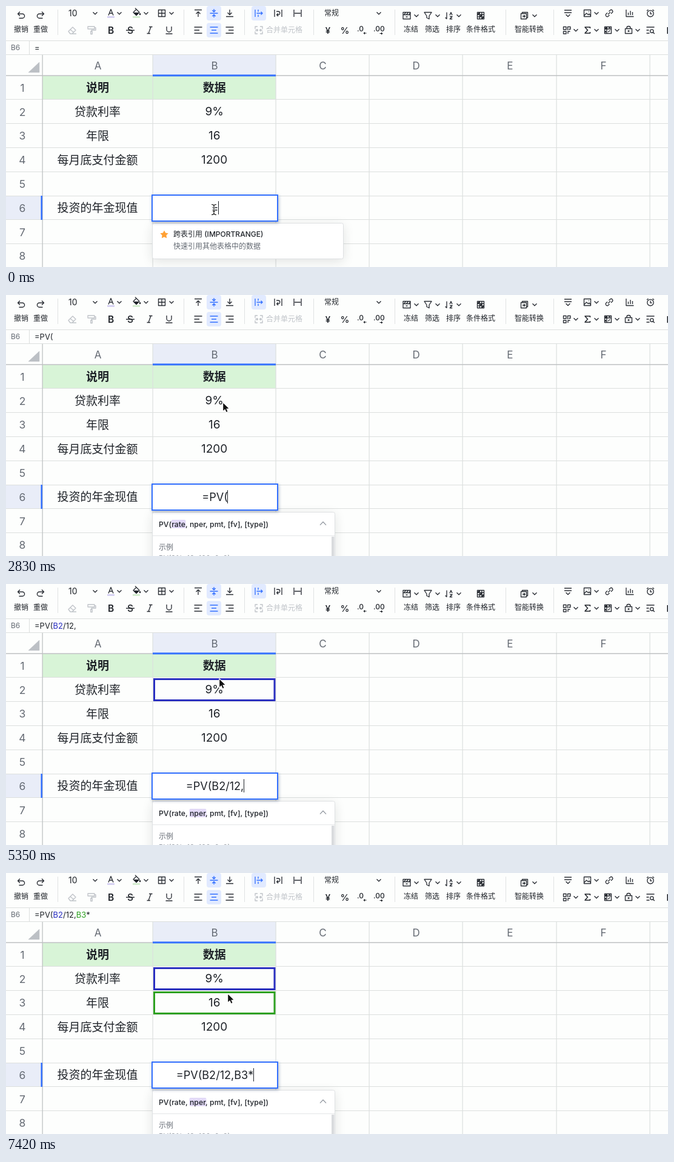
Write an HTML page with a canvas that moves like this. It is 1092 by 432 pixels and loops after 8000 ms.

```html
<!DOCTYPE html>
<html lang="zh-CN">
<head>
<meta charset="utf-8">
<style>
html, body { margin: 0; width: 100%; height: 100%; overflow: hidden; background: #fdfefd; }
canvas { display: block; width: 1092px; height: 432px; }
</style>
</head>
<body>
<canvas id="stage" width="1092" height="432"></canvas>
<script>
const ctx = document.getElementById('stage').getContext('2d');
const FONT = 'Inter, "Noto Sans CJK SC", "Noto Sans CJK", sans-serif';
const LOOP = 8000;
const INK = '#1f2329', GREY = '#646a73', PALE = '#bfc3c8', BLUE = '#3370ff';
const NAVY = '#2a2fc0', GREEN = '#2ea121', PAPER = '#fdfefd', LINE = '#dcdfde';
const COLS = [60, 242, 445, 599, 753.5, 908, 1062, 1216];
const rowY = n => 115.5 + n * 39.8;

// Each step changes part of the state from its time on.
const STEPS = [
  [0, { formula: '=', pop: 'ref', arg: 'rate', caret: true, cur: ['beam', 343, 337] }],
  [150, { caret: false }],
  [600, { caret: true }],
  [1050, { formula: '=p', pop: '' }],
  [1200, { pop: 'list', items: [['PERCENTILE', '返回数据集给定百分点上的值。'], ['PERCENTRANK', '']] }],
  [1490, { formula: '=pv' }],
  [1640, { items: [['PV', '返回年金投资的现值。'], ['PVIF', '']] }],
  [1790, { cur: ['hand', 347, 390] }],
  [1930, { formula: '=PV(', pop: '' }],
  [2080, { pop: 'help' }],
  [2380, { cur: ['beam', 349, 345] }],
  [2530, { cur: ['arrow', 352, 268] }],
  [2680, { cur: ['arrow', 356, 202] }],
  [2820, { cur: ['arrow', 358, 178] }],
  [2970, { cur: ['arrow', 358, 173], formula: '=PV(B2', b2: 'dash' }],
  [3120, { pop: '' }],
  [3570, { caret: false }],
  [3720, { formula: '=PV(B2/', caret: true, b2: 'solid', pop: 'help' }],
  [4160, { formula: '=PV(B2/1' }],
  [4310, { formula: '=PV(B2/12' }],
  [4910, { formula: '=PV(B2/12,' }],
  [5060, { arg: 'nper' }],
  [5350, { cur: ['arrow', 352, 157] }],
  [5500, { cur: ['arrow', 356, 171] }],
  [5650, { cur: ['arrow', 362, 190] }],
  [5790, { cur: ['arrow', 366, 200] }],
  [5930, { formula: '=PV(B2/12,B3', b3: 'dash' }],
  [6080, { pop: '' }],
  [6680, { caret: false }],
  [7120, { caret: true }],
  [7420, { formula: '=PV(B2/12,B3*', b3: 'solid', pop: 'help' }]
];

function stateAt(t) {
  const s = {};
  for (const [at, change] of STEPS) if (at <= t) Object.assign(s, change);
  return s;
}

function setFont(size, weight = 400) {
  ctx.font = `${weight} ${size}px ${FONT}`;
}

// Text centred vertically on y.
function text(str, x, y, size, color = INK, align = 'left', weight = 400) {
  setFont(size, weight);
  ctx.fillStyle = color;
  ctx.textAlign = align;
  ctx.fillText(str, x, y + size * 0.37);
  return ctx.measureText(str).width;
}

function rect(x, y, w, h, color) {
  ctx.fillStyle = color;
  ctx.fillRect(x, y, w, h);
}

function pill(x, y, w, h, r, color) {
  ctx.beginPath();
  ctx.roundRect(x, y, w, h, r);
  ctx.fillStyle = color;
  ctx.fill();
}

function icon(x, y, path, color = '#2b2f36', width = 1.35, fill) {
  const p = new Path2D(path);
  ctx.save();
  ctx.translate(x, y);
  ctx.lineWidth = width;
  ctx.lineJoin = 'round';
  ctx.strokeStyle = color;
  if (fill) { ctx.fillStyle = fill; ctx.fill(p); }
  ctx.stroke(p);
  ctx.restore();
}

const chevron = (x, y) => icon(x, y, 'M-3.5-1.8L0 1.7L3.5-1.8');
const SHEET = 'M-5.5-5.5H5.5V5.5H-5.5Z';

function toolbar() {
  for (const x of [85, 293, 393, 507, 641, 824, 903]) rect(x, 6, 1, 42, '#e0e2e3');
  for (const [x, y] of [[331, 0], [331, 28], [405, 0]]) pill(x, y, 24, 24, 4, '#e1eaff');

  icon(25, 15, 'M-2-5.5L-5.5-2L-2 1.5M-5-2H2A3.6 3.6 0 0 1 2 5.2H-3.5');
  icon(57, 15, 'M2-5.5L5.5-2L2 1.5M5-2H-2A3.6 3.6 0 0 0-2 5.2H3.5');
  text('10', 103, 12, 14);
  icon(109, 40, 'M-6 2L1-5L6 0L0 6H-3ZM-3-1L3 4M0 6H7', PALE);
  icon(141, 40, 'M-6-6H5V-2H-6ZM5-4H7V0H0V2M-1.2 2H1.2V6.5H-1.2Z', PALE);

  icon(173, 10.5, 'M-4 5L0-5L4 5M-2.5 1.5H2.5');
  rect(167, 17, 12, 2.5, '#cfc9f0');
  icon(215, 10.5, 'M-5 0L0-5L5 0L0 5ZM-2-7L0-5');
  icon(215, 10.5, 'M-4.5 .5H4.5L0 5Z', INK, 0.5, INK);
  icon(221, 14, 'M0-2V1', INK, 2);
  rect(209, 17, 12, 2.5, '#cdebc8');
  icon(257, 12, SHEET + 'M0-5.5V5.5M-5.5 0H5.5');
  text('B', 173, 40, 15.5, INK, 'center', 600);
  text('S', 205, 40, 15.5, INK, 'center', 500);
  rect(198, 39.5, 14, 1.4, INK);
  icon(237, 40, 'M-1-5.5H4.5M-4.5 5.5H1M2-5.5L-2 5.5');
  icon(269, 40, 'M-4-6V-1A4 4 0 0 0 4-1V-6M-5.5 6H5.5');

  icon(317, 12, 'M-6-5.5H6M0 6V-2M-3.5 1L0-2.5L3.5 1');
  icon(343, 12, 'M-6.5 0H6.5M0-7V-2.5M-2.7-5L0-2.3L2.7-5M0 7V2.5M-2.7 5L0 2.3L2.7 5', BLUE);
  icon(369, 12, 'M-6 5.5H6M0-6V2M-3.5-1L0 2.5L3.5-1');
  icon(317, 40, 'M-6.5-5H6.5M-6.5 0H2M-6.5 5H6.5');
  icon(343, 40, 'M-6.5-5H6.5M-4 0H4M-6.5 5H6.5', BLUE);
  icon(369, 40, 'M-6.5-5H6.5M-2 0H6.5M-6.5 5H6.5');

  icon(417, 12, 'M-6-6V6M-1-6V-2.5M-1 2.5V6M-3.5 0H6M3.5-2.5L6 0L3.5 2.5', BLUE);
  icon(449, 12, 'M-6-6V6M6-6V6M-3-3H0A2.8 2.8 0 0 1 0 2.6H-2M0 .2L-2.4 2.6L0 5');
  icon(481, 12, 'M-6-6V6M6-6V6M-5 0H5');
  icon(417, 40, 'M-2-6H-6V-2M2-6H6V-2M-6 2V6H-2M6 2V6H2M-6 0H-1.5M1.5 0H6M-3.5-2L-1.5 0L-3.5 2M3.5-2L1.5 0L3.5 2', PALE);
  text('合并单元格', 429, 40, 12, PALE);

  text('常规', 525, 12, 12);
  text('¥', 531, 40, 15, INK, 'center', 500);
  text('%', 559, 40, 15, INK, 'center', 500);
  text('.0', 579, 38, 12, INK, 'left', 500);
  text('.00', 606, 37.5, 12, INK, 'left', 500);
  icon(592, 45, 'M2.5 0H-1.5M0-1.6L-1.7 0L0 1.6', INK, 1.1);
  icon(619, 45.5, 'M-2.5 0H1.5M0-1.6L1.7 0L0 1.6', INK, 1.1);

  icon(661, 16, 'M-6-5.5H6V5.5H-6ZM-6-1.5H6M-4.5-1.5L-1.5-5.5M-.5-1.5L2.5-5.5M3.5-1.5L5.5-4.5M-1.5 2H1.5');
  icon(696, 16, 'M-6-5.5H6L2 .5V5.5L-2 3.5V.5Z');
  icon(731, 16, 'M-4-5.5V5.5M-6.3 3L-4 5.5M1-.8L3-5.5L5-.8M1.2 1.5H5L1.2 5.5H5.2');
  icon(783, 16, SHEET + 'M-5.5-1.8H5.5M-5.5 1.8H5.5M-1.8-5.5V5.5M1.8-5.5V5.5');
  icon(783, 16, 'M-5-2L-2-5M-1 1.5L2-1.5M2 5L5 2', INK, 2);
  icon(855, 16, 'M-3.5-3.5V-5.5H5.5V3.5H3.5M-5.5-3.5H3.5V5.5H-5.5ZM-3 1H1M-.8-1L1.2 1L-.8 3');
  for (const [s, x] of [['撤销', 25], ['重做', 57], ['冻结', 668], ['筛选', 703], ['排序', 738], ['条件格式', 783], ['智能转换', 863]])
    text(s, x, 39, 12, INK, 'center');

  icon(927, 12, 'M-6-5H6M-6-1H6M-3.5 2L0 5.5L3.5 2');
  icon(959, 12, SHEET + 'M-5.5 4L-1.5 0L1.5 2.5L3 1L5.5 4M2-2.5H3');
  icon(995, 12, 'M-.5-3L2-5.3A2.6 2.6 0 0 1 5.5-1.7L3 .8M.5 3L-2 5.3A2.6 2.6 0 0 1-5.5 1.7L-3-.8M-2 2L2-2');
  icon(1029, 12, 'M-6-6V5.5H6.5M-2.5 3V-1M1 3V-4M4.5 3V-2');
  icon(1063, 12, 'M5.2 .5A5.2 5.2 0 1 1-5.2 .5A5.2 5.2 0 1 1 5.2 .5ZM0-2.5V1H2.5M-6-4L-3.5-6M6-4L3.5-6');
  icon(925, 40, 'M-1-5.5H-5.5V-1H-1ZM1.5 0V-5.5H6V-1.5H3M-5.5 2H-1V6H-5.5ZM2 6V2H5.5');
  icon(959, 40, 'M4.5-3V-5H-4L.5 0L-4 5H4.5V3', INK, 1.5);
  icon(993, 40, SHEET + 'M-5.5-2H5.5M-2-5.5V5.5M0 3L3.5 .5');
  icon(993, 40, 'M-4-4H-2V-2H-4ZM1-4H4M-4 1V4', INK, 1.7);
  icon(1027, 40, 'M-5.5-2.5H5.5V5.5H-5.5ZM-3-2.5V-4A3 2.5 0 0 1 3-4V-2.5M0 0V3M-1.5 1.5H1.5');
  icon(1063, 40, 'M-6.5-5H6.5M-6.5 0H-2.5M-6.5 5H-1.5M5 1.5A2.7 2.7 0 1 1-.4 1.5A2.7 2.7 0 1 1 5 1.5ZM4.2 3.4L6.8 6');
  rect(1090.5, 35, 1.5, 11, INK);

  for (const x of [147, 187, 231, 273, 615, 974]) chevron(x, 12);
  for (const x of [677, 712, 747, 872]) chevron(x, 16);
  for (const x of [940, 974, 1008, 1042]) chevron(x, 40);
}

// References are set apart from the text around them.
const tokens = formula => formula.split(/(B2|B3)/);
const refColor = { B2: NAVY, B3: GREEN };

function formulaBar(s) {
  rect(0, 57, 1092, 1, LINE);
  rect(0, 80, 1092, 1, LINE);
  rect(38, 58, 1, 22, LINE);
  text('B6', 8, 69, 12, GREY);
  let x = 47;
  for (const part of tokens(s.formula)) x += text(part, x, 69.3, 13, refColor[part]);
}

function reference(row, kind, color, tint) {
  if (!kind) return;
  const y = Math.ceil(rowY(row - 1));
  const dash = kind === 'dash';
  ctx.save();
  if (dash) {
    rect(243, y, 201, 38, tint);
    ctx.setLineDash([5, 3.5]);
  }
  ctx.strokeStyle = color;
  ctx.lineWidth = dash ? 1.6 : 3;
  const d = ctx.lineWidth / 2;
  ctx.strokeRect(243 + d, y + d, 201.5 - 2 * d, 38 - 2 * d);
  ctx.restore();
}

function sheet(s) {
  rect(242, 81, 203, 34, '#e9edf8');
  rect(0, 315, 60, 39, '#e9edf8');
  rect(60, 116, 385, 39, '#d8f4d7');
  for (let n = 1; n < 9; n++) rect(0, Math.round(rowY(n)) - 1, 1092, 1, LINE);
  for (const x of COLS.slice(1)) rect(Math.floor(x) - 0.5, 81, 1.2, 351, LINE);
  rect(0, 114.5, 1092, 1.5, '#bfc2c3');
  rect(59.5, 81, 1.3, 351, '#bfc2c3');
  icon(0, 0, 'M55 93V110H37Z', '#bcc0c5', 0.5, '#bcc0c5');
  rect(242, 113.5, 203, 3, BLUE);
  rect(57.5, 314, 2.5, 40, BLUE);

  [...'ABCDEF'].forEach((c, i) => text(c, (COLS[i] + COLS[i + 1]) / 2 + 0.5, 98.5, 17, GREY, 'center'));
  for (let n = 1; n < 9; n++) text(n, 27, rowY(n - 0.5), 17.5, GREY, 'center');

  reference(2, s.b2, NAVY, '#e7e8f7');
  reference(3, s.b3, GREEN, '#eaf4e8');

  const rows = [['说明', '数据'], ['贷款利率', '9%'], ['年限', '16'], ['每月底支付金额', '1200'], [], ['投资的年金现值']];
  rows.forEach(([label = '', value = ''], i) => {
    const y = rowY(i + 0.5), weight = i ? 400 : 700;
    text(label, 151, y, 19, INK, 'center', weight);
    text(value, 343.7, y - (i ? 0.9 : 0), 19, INK, 'center', weight);
  });
}

function shadowed(blur, color, dx, dy, draw) {
  ctx.save();
  ctx.shadowBlur = blur;
  ctx.shadowColor = color;
  ctx.shadowOffsetX = dx;
  ctx.shadowOffsetY = dy;
  draw();
  ctx.restore();
}

function editor(s) {
  shadowed(5, 'rgba(30,50,90,.35)', 1, 2, () => rect(240, 312, 209, 45, BLUE));
  rect(242, 314, 205, 41, '#fff');
  const parts = tokens(s.formula), size = 18.1;
  setFont(size);
  const width = parts.reduce((sum, p) => sum + ctx.measureText(p).width, 0);
  let x = 344.5 - width / 2;
  for (const part of parts) x += text(part, x, 334.2, size);
  if (s.caret) rect(Math.round(x - 0.5), 323, 1, 22, INK);
}

function panel(w, h) {
  shadowed(18, 'rgba(31,35,41,.13)', 0, 4, () => pill(241.5, 359.5, w, h, 3, '#fff'));
  ctx.strokeStyle = '#dee0e2';
  ctx.lineWidth = 1;
  ctx.stroke();
}

function star(x, y, r) {
  ctx.beginPath();
  for (let i = 0; i < 10; i++) {
    const a = i * Math.PI / 5 - Math.PI / 2, d = i % 2 ? r * 0.52 : r;
    ctx.lineTo(x + d * Math.cos(a), y + d * Math.sin(a));
  }
  ctx.fillStyle = '#ffa033';
  ctx.fill();
}

const popups = {
  ref() {
    panel(315, 59);
    star(261, 378.5, 7);
    text('跨表引用 (IMPORTRANGE)', 276, 378, 12, INK, 'left', 500);
    text('快速引用其他表格中的数据', 276, 398, 12, GREY);
  },
  list(s) {
    panel(299, 100);
    rect(242, 360, 298, 57, '#f3f4f5');
    s.items.forEach(([name, note], i) => {
      text(name, 252, 378 + i * 56, 12);
      text(note, 252, 399 + i * 56, 12, '#8f959e');
    });
  },
  help(s) {
    panel(301, 100);
    const sig = 'PV(rate, nper, pmt, [fv], [type])', size = 12.25;
    setFont(size, 500);
    const x = 252 + ctx.measureText(sig.slice(0, sig.indexOf(s.arg))).width;
    pill(x - 0.5, 372, ctx.measureText(s.arg).width + 1, 14, 2, '#e3daf7');
    text(sig, 252, 379, size, INK, 'left', 500);
    icon(523, 378, 'M-5 2.8L0-2.5L5 2.8', '#8f959e', 1.2);
    rect(242, 398, 300, 1, '#e3e5e6');
    text('示例', 252, 418, 12, GREY);
    text('PV(8%, 12, 100, 0, 0)', 252, 436, 12, '#8f959e');
    rect(537, 400, 4.5, 32, '#d9dbdd');
  }
};

const cursors = {
  beam() {
    const p = 'M-4-8.5Q0-8.5 0-6Q0-8.5 4-8.5M0-6V6M-4 8.5Q0 8.5 0 6Q0 8.5 4 8.5M-2 2.5H2';
    return [[p, '#fff', 3], [p, '#111', 1.2]];
  },
  arrow() {
    return [['M0 0V14.2L3.2 11.2L5.4 16.2L7.9 15.1L5.7 10.3H10.2Z', '#fff', 1.6, '#111'],
      ['M.6 1.5V13L3.4 10.2L5.7 15.3L7 14.8L4.8 9.6H8.8Z', '#111', 0.6, '#111']];
  },
  hand() {
    return [['M-2.5 2V-6.2A1.4 1.4 0 0 1 .3-6.2V-1.8Q1.8-3 2.8-1.3Q4.4-2 5-.4Q6.8-.6 6.8 1.5V4Q6.5 6 5 7.5V9.5H-1.5V7.5L-5.5 2.5Q-6.2 .2-4.4 .2Z', '#111', 1.3, '#fff'],
      ['M-.2 3V6.5M2 3V6.5M4.2 3V6.5', '#111', 1]];
  }
};

function cursor([kind, x, y]) {
  for (const layer of cursors[kind]()) icon(x, y, ...layer);
}

function draw(t) {
  const s = stateAt(t);
  rect(0, 0, 1092, 432, PAPER);
  toolbar();
  formulaBar(s);
  sheet(s);
  if (s.pop) popups[s.pop](s);
  editor(s);
  cursor(s.cur);
}

const start = performance.now();
function tick(now) {
  draw(Math.max(0, now - start) % LOOP);
  requestAnimationFrame(tick);
}
draw(0);
requestAnimationFrame(tick);
</script>
</body>
</html>
```
